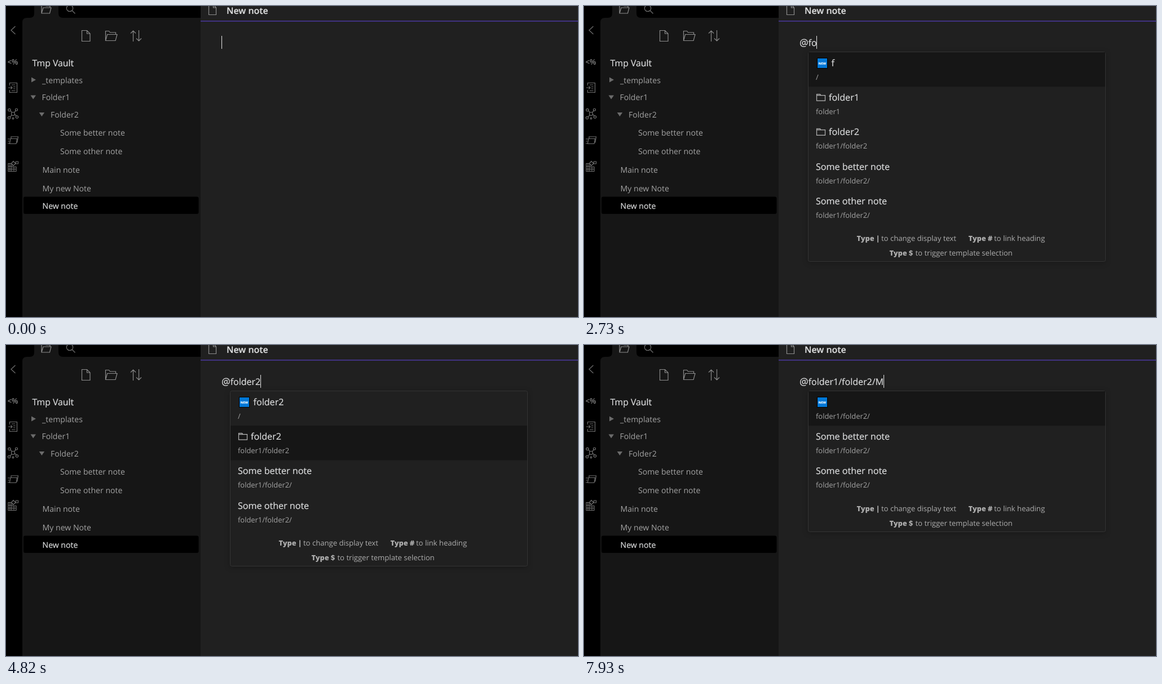
Write an HTML page that moves like this. It is 1014 px wide and 552 px high and loops after 8000 ms.

```html
<!DOCTYPE html>
<html lang="en">
<head>
<meta charset="utf-8">
<title>Linking notes by path</title>
<style>
  html, body { margin: 0; width: 100%; height: 100%; overflow: hidden; background: #202020; }
  svg { display: block; font-family: "Open Sans", "Noto Sans", sans-serif; text-rendering: geometricPrecision; }
  text { white-space: pre; }
  .tree { font-size: 14.1px; fill: #a3a3a3; }
  .lit, .title { fill: #dcddde; stroke: #dcddde; stroke-width: .2; }
  .icon { fill: none; stroke: #8c8c8c; stroke-width: 1.2; }
  .dim { stroke: #6e6e6e; }
  .title { font-size: 16.1px; }
  .path { font-size: 12.9px; fill: #a3a3a3; }
  .hint { font-size: 13.1px; fill: #adadad; }
  .hint tspan { font-size: 12.7px; font-weight: 800; }
  .box { fill: #202020; stroke: #343434; filter: drop-shadow(0 2px 5px rgba(0, 0, 0, .25)); }
</style>
</head>
<body>
<svg width="1014" height="552" viewBox="0 0 1014 552">
  <rect width="345" height="552"/>
  <path fill="#161616" d="M29 552V29Q29 21 37 21H42Q50 21 50 13V0H93V13Q93 21 101 21H345V552Z"/>
  <rect x="345" y="26" width="669" height="1.6" fill="#483699"/>

  <!-- tabs, toolbar and note header -->
  <g class="icon">
    <path d="M63 12V-3H69L71 0H78V3M63 13L66 3H80L77.500 13Z"/>
    <g class="dim"><circle cx="113" cy="4" r="5.700"/><path d="M117 8L122.500 13.500"/></g>
    <path d="M134.500 43.500H143.500L149 49V62.500H134.500ZM143.500 43.500V49H149"/>
    <path d="M176.500 61V44.500H182.500L184.500 47H194.500V50.500M176.500 61.500L179.500 50.500H197L194 61.500Z"/>
    <path d="M225.500 63V44M221 48.500L225.500 44L230 48.500M235.500 43V62M231 57.500L235.500 62L240 57.500"/>
    <path d="M359.500 -2.500H367.500L372.500 3V15.500H359.500ZM367.500 -2.500V3H372.500"/>
  </g>
  <text x="391" y="13.500" font-size="15.900" font-weight="600" class="lit">New note</text>

  <!-- ribbon -->
  <g class="icon dim">
    <path d="M16.500 36L9 43L16.500 50"/>
    <path d="M6.500 141V136.500H19.500V153.500H6.500V149M10 140H16.500M13 143.500H16.500M13 147H16.500M10 150.500H16.500M4 145H11M8.500 142.500L11 145L8.500 147.500"/>
    <path d="M8 186L10.500 189M17.500 185.500L14.500 189M7 197L10 194M15.500 192.500L18.500 195"/>
    <circle cx="12.500" cy="191.500" r="3"/><circle cx="6" cy="184.500" r="2.200"/><circle cx="18.500" cy="184" r="2"/>
    <circle cx="5.500" cy="198.500" r="2.200"/><circle cx="19.500" cy="197" r="2.200"/><circle cx="12.500" cy="199.500" r="1.300"/>
    <path d="M8 235.500H19.500L18 244.500H6.500ZM9 235V232H21.500L20 242H18.500M3 236H7M3.500 240H6M3 244H6"/>
    <path d="M4 279.500H10V293.500H4ZM10 285.500H18V293.500H10M4 284.500H10M4 289.500H18M14 285.500V293.500M7 279.500V293.500M13 275.500L17 279.500L13 283.500L9.500 279.500ZM17.500 276H21.500V280H17.500Z"/>
  </g>
  <text x="2.500" y="103.500" font-size="13.300" font-weight="600" fill="#858585">&lt;%</text>

  <!-- file tree -->
  <rect x="31" y="338.500" width="310.500" height="30.500" rx="3"/>
  <path fill="#6b6b6b" d="M45 126.500L53 131L45 135.500ZM43.500 158.500H53L48.200 165.500ZM58.700 189H68.200L63.400 196Z"/>
  <text x="46.500" y="107" font-size="15.800" class="lit">Tmp Vault</text>
  <g class="tree">
    <text x="64" y="136.500">_templates</text>
    <text x="63.500" y="166.800">Folder1</text>
    <text x="79" y="198.300">Folder2</text>
    <text x="96" y="229.500">Some better note</text>
    <text x="96" y="262.500">Some other note</text>
    <text x="64.500" y="295.500">Main note</text>
    <text x="64.500" y="328.500">My new Note</text>
    <text x="64.500" y="360.300" class="lit">New note</text>
  </g>

  <!-- editor -->
  <text x="382" y="71.300" font-size="16" class="lit"><tspan id="at" font-size="17.400"></tspan><tspan id="typed"></tspan></text>
  <rect id="caret" y="53" width="1" height="23" fill="#e6e6e6"/>
  <g id="popup"></g>
</svg>
<script>
const LOOP = 8000, BLINK = 530, ROW = 61.2, TOP = 82;
const $ = id => document.getElementById(id);

const row = (icon, name, path) => ({ icon, name, path });
const dir1 = row('dir', 'folder1', 'folder1');
const dir2 = row('dir', 'folder2', 'folder1/folder2');
const notes = ['Some better note', 'Some other note'].map(n => row('', n, 'folder1/folder2/'));
const search = q => ({ rows: [row('new', q, '/'), dir1, dir2, ...notes] });
const exact = sel => ({ rows: [row('new', 'folder2', '/'), dir2, ...notes], sel });

// The first entry only sets the blink phase at the start.
const typing = [
  [-330, ''], [1790, '@'], [2590, '@f'], [2730, '@fo'], [2800, '@fol'], [2930, '@fold'],
  [3150, '@folde'], [3220, '@folder'], [3750, '@folder2'], [5150, '@folder1/folder2'],
  [6540, '@folder1/folder2/'], [7930, '@folder1/folder2/M']
];
const lists = [
  [0, null],
  [1860, { rows: [row('dir', '', '/'), row('dir', '_templates', '_templates'), dir1, dir2, row('', 'Main note', '/')], scroll: true }],
  [2660, search('f')], [2800, search('fo')], [2930, search('fol')], [3000, search('fold')],
  [3220, search('folde')], [3290, search('folder')],
  [3820, exact(0)], [4350, exact(1)],
  [5150, { rows: [dir2, ...notes] }],
  [6610, { rows: [row('new', '', 'folder1/folder2/'), ...notes] }]
];

const icons = {
  '': '',
  dir: '<path class="icon" style="stroke:#b5b5b5" d="M412.500 97.500H427.500V107H412.500ZM412.500 97.500V95.500H418.500L420 97.500"/>',
  new: '<rect x="413.500" y="92.500" width="18" height="18" fill="#0078d7" stroke="#000"/>' +
       '<text x="422.500" y="103.500" font-size="5.500" font-weight="800" fill="#fff" text-anchor="middle">NEW</text>'
};
const titleX = { '': 411, dir: 434, new: 438.5 };

const hint = (x, y, key, textX, label) =>
  `<text class="hint" x="${x}" y="${y}"><tspan>Type ${key}</tspan></text>` +
  `<text class="hint" x="${textX}" y="${y}">${label}</text>`;

function popupMarkup(list) {
  if (!list) return '';
  const { rows, sel = 0, scroll } = list;
  const bottom = scroll ? 465 : 148 + ROW * rows.length;
  const items = rows.map((r, i) => `<g transform="translate(0 ${i * ROW})">${icons[r.icon]}
    <text class="title" x="${titleX[r.icon]}" y="107">${r.name}</text>
    <text class="path" x="411" y="131">${r.path}</text></g>`).join('');
  const bar = scroll
    ? `<rect x="914" y="82" width="10.500" height="316.500" rx="5" fill="#2b2b2b"/>
       <rect x="914" y="82" width="10.500" height="102" rx="5" fill="#454545"/>` : '';
  return `<rect class="box" x="397.500" y="81.500" width="527" height="${Math.round(bottom) - 82}" rx="3"/>
    <rect x="398" y="${TOP + sel * ROW}" width="${scroll ? 516 : 526}" height="${ROW}" fill="#161616"/>` +
    items + bar +
    hint(483.5, bottom - 37, '|', 527, 'to change display text') +
    hint(681.5, bottom - 37, '#', 727, 'to link heading') +
    hint(541.5, bottom - 11, '$', 587.5, 'to trigger template selection');
}

const current = (track, t) => track.findLast(([start]) => start <= t);
let shownList;

function draw() {
  const t = performance.now() % LOOP;
  const [since, text] = current(typing, t);
  const list = current(lists, t)[1];
  $('at').textContent = text.slice(0, 1);
  $('typed').textContent = text.slice(1);
  const width = text ? $('at').parentNode.getComputedTextLength() : 0;
  $('caret').setAttribute('x', Math.floor(382 + width));
  $('caret').style.display = Math.floor((t - since) / BLINK) % 2 ? 'none' : '';
  if (list !== shownList) {
    $('popup').innerHTML = popupMarkup(list);
    shownList = list;
  }
  requestAnimationFrame(draw);
}
draw();
</script>
</body>
</html>
```
